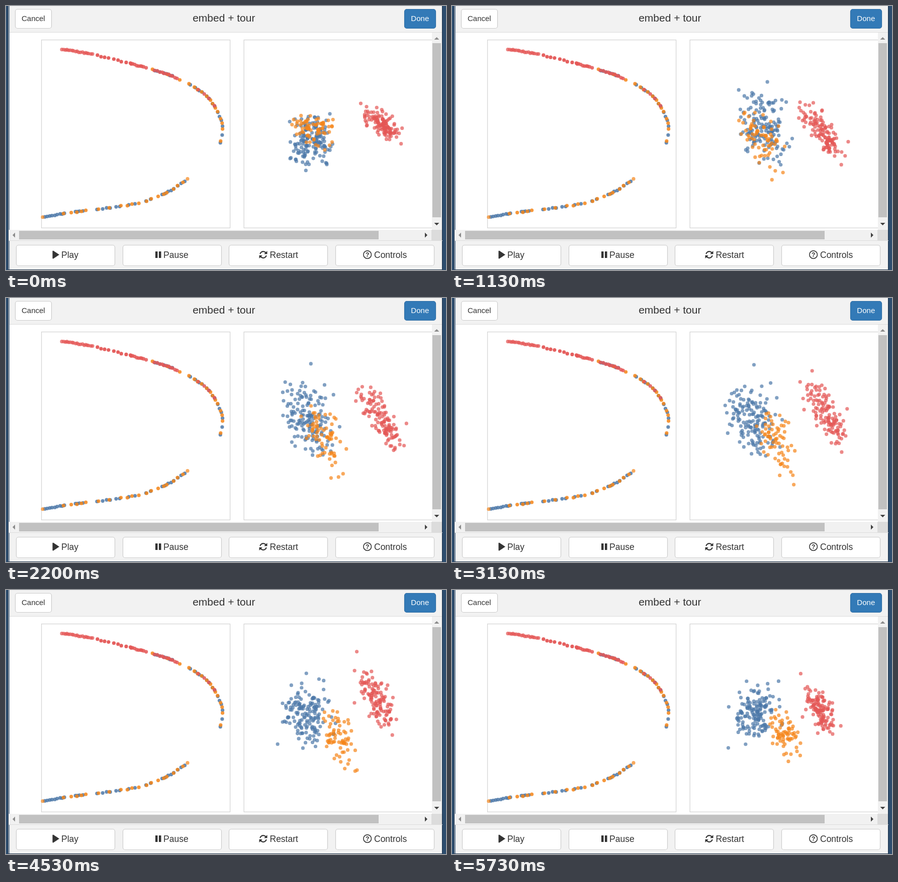
These frames come from a looping animation (875 px wide and 526 px high, 5.87 s). An HTML page with a canvas:

```html
<!DOCTYPE html>
<html lang="en">
<head>
<meta charset="utf-8">
<title>embed + tour</title>
<style>
html, body { margin: 0; width: 100%; height: 100%; overflow: hidden; background: #f2f2f2; }
canvas { display: block; width: 875px; height: 526px; }
</style>
</head>
<body>
<canvas id="stage" width="875" height="526"></canvas>
<script>
const ctx = document.getElementById('stage').getContext('2d');
const LOOP = 5870;
const BLUE = '#4c78a8', ORANGE = '#f58518', RED = '#e45756';
const INK = '#333';
const FONT = '"Liberation Sans", Arial, sans-serif';

// ---------- helpers ----------
const mix = (a, b, f) => a + (b - a) * f;

function random(seed) {
  return () => {
    seed = (seed + 0x6D2B79F5) | 0;
    let n = Math.imul(seed ^ (seed >>> 15), 1 | seed);
    n = (n + Math.imul(n ^ (n >>> 7), 61 | n)) ^ n;
    return ((n ^ (n >>> 14)) >>> 0) / 4294967296;
  };
}

// Smooth curve through vals given at keys, held at both ends.
function spline(keys, vals, t) {
  const last = keys.length - 1;
  if (t <= keys[0]) return vals[0];
  if (t >= keys[last]) return vals[last];
  let i = 0;
  while (keys[i + 1] <= t) i++;
  const slope = j => {
    const a = Math.max(j - 1, 0), b = Math.min(j + 1, last);
    return (vals[b] - vals[a]) / (keys[b] - keys[a]);
  };
  const w = keys[i + 1] - keys[i], f = (t - keys[i]) / w, g = 1 - f;
  return vals[i] * (1 + 2 * f) * g * g + vals[i + 1] * f * f * (3 - 2 * f) +
    w * f * g * (slope(i) * g - slope(i + 1) * f);
}

function rect(x, y, w, h, color) {
  ctx.fillStyle = color;
  ctx.fillRect(x, y, w, h);
}

function poly(color, ...pts) {
  ctx.fillStyle = color;
  ctx.beginPath();
  for (let i = 0; i < pts.length; i += 2) ctx.lineTo(pts[i], pts[i + 1]);
  ctx.fill();
}

function dot(x, y, color, alpha) {
  ctx.globalAlpha = alpha;
  ctx.fillStyle = color;
  ctx.beginPath();
  ctx.arc(x, y, 3.6, 0, Math.PI * 2);
  ctx.fill();
  ctx.globalAlpha = 1;
}

function text(str, x, y, size, color = INK, align = 'left', weight = 400) {
  ctx.font = `${weight} ${size}px ${FONT}`;
  ctx.textAlign = align;
  ctx.fillStyle = color;
  ctx.fillText(str, x, y);
}

function button(x, y, w, h, fill = '#fff', line = '#ccc') {
  ctx.beginPath();
  ctx.roundRect(x + 0.5, y + 0.5, w - 1, h - 1, 4.5);
  ctx.fillStyle = fill;
  ctx.fill();
  ctx.strokeStyle = line;
  ctx.lineWidth = 1.2;
  ctx.stroke();
}

// ---------- left plot: dots strung along two curves ----------
// Points are looked up by x + slant * y, which grows along the curve.
function curve(slant, pts) {
  const xs = pts.map(p => p[0]), ys = pts.map(p => p[1]);
  const keys = pts.map(p => p[0] + slant * p[1]);
  return k => [spline(keys, xs, k), spline(keys, ys, k)];
}

const arch = curve(1, [[111, 86], [172, 96.5], [278, 123], [340, 144], [400, 181],
  [429, 230], [430, 255], [426, 273]]);
const tail = curve(0, [[73, 421], [130, 411.5], [205, 402], [270, 391], [321, 371], [361, 345]]);

const bands = [];
const rnd = random(5);
function band(path, color, from, to, count, alpha = 0.85) {
  const gap = (to - from) / Math.max(count - 1, 1);
  for (let i = 0; i < count; i++) {
    const [x, y] = path(from + gap * (i + (rnd() - 0.5) * 0.5));
    bands.push([x, y + (rnd() - 0.5) * 2, color, alpha]);
  }
}
band(arch, BLUE, 424, 470, 7);
band(arch, BLUE, 524, 698, 14);
band(arch, ORANGE, 415, 496, 3);
band(arch, ORANGE, 519, 693, 13);
band(arch, RED, 197, 268, 19, 0.75);
band(arch, RED, 279, 361, 9, 0.95);
band(arch, RED, 364, 401, 9);
band(arch, RED, 424, 484, 11);
band(arch, RED, 547, 614, 4);
band(tail, BLUE, 77, 117, 9);
band(tail, BLUE, 137, 152, 4);
band(tail, BLUE, 183, 217, 5);
band(tail, BLUE, 229, 290, 5);
band(tail, BLUE, 309, 355, 8);
band(tail, ORANGE, 73, 73, 1, 0.7);
band(tail, ORANGE, 117, 161, 5);
band(tail, ORANGE, 184, 205, 2);
band(tail, ORANGE, 229, 301, 7);
band(tail, ORANGE, 312, 351, 5);
band(tail, ORANGE, 361, 361, 1, 0.7);

// ---------- right plot: clouds in four dimensions, slowly turned ----------
const KEYS = [0, 670, 2200, 4530, 5730];

// Spreads and tilt are [start, end, extra in the middle of the tour].
function cloud(color, count, seed, cx, cy, wide, high, tilt) {
  const next = random(seed);
  const bell = () => (next() + next() + next() - 1.5) * 2;
  const pts = Array.from({ length: count }, () => [bell(), bell(), bell(), bell()]);
  return { color, pts, cx, cy, wide, high, tilt };
}

const clouds = [
  cloud(BLUE, 151, 11, [608, 626, 601, 597, 602], [270, 247, 243, 250, 246],
    [21, 21, 3], [22, 24, 11], [0, -0.15, 0.35]),
  cloud(ORANGE, 68, 23, [615, 613, 634, 660, 659], [243, 257, 276, 293, 286],
    [20, 14, 4], [17, 21, 13], [0.1, 0.2, 0.45]),
  cloud(RED, 123, 37, [748, 734, 746, 737, 732], [235, 251, 238, 215, 237],
    [18, 14, 4], [18, 20, 14], [0.65, 0.4, 0.2])
];

function drawCloud({ color, pts, cx, cy, wide, high, tilt }, t) {
  const part = t / LOOP;
  const swell = Math.sin(Math.PI * part ** 0.7);
  const at = ([a, b, extra]) => mix(a, b, part) + extra * swell;
  const x = spline(KEYS, cx, t), y = spline(KEYS, cy, t);
  const sx = at(wide), sy = at(high), r = at(tilt);
  const rest = Math.sqrt(1 - r * r);
  const c = Math.cos(part * 2), s = Math.sin(part * 2);
  for (const p of pts) {
    const u = p[0] * c + p[2] * s, v = p[1] * c + p[3] * s;
    dot(x + sx * u, y + sy * (r * u + rest * v), color, 0.7);
  }
}

// ---------- window ----------
function frame() {
  rect(0, 0, 875, 526, '#f2f2f2');
  rect(5, 52, 863, 1, '#ddd');
  rect(5, 53, 842, 393, '#fff');
  ctx.strokeStyle = '#d5d5d5';
  ctx.lineWidth = 1.3;
  for (const x of [70.6, 473.2]) ctx.strokeRect(x, 67.6, 375, 374.6);
}

function scrollbars() {
  rect(847, 53, 20, 394, '#f1f1f1');
  rect(848, 74, 17, 347, '#c1c1c1');
  poly('#8b8b8b', 851.5, 67, 856.5, 62, 861.5, 67);
  poly('#404040', 851.5, 432, 861.5, 432, 856.5, 437);
  rect(5, 446, 842, 21, '#f1f1f1');
  rect(26, 448, 715, 17, '#c1c1c1');
  poly('#8b8b8b', 18, 451.5, 18, 461.5, 13, 456.5);
  poly('#404040', 833, 451.5, 833, 461.5, 838, 456.5);
  rect(846, 446, 21, 21, '#dcdcdc');
  rect(5, 467, 863, 1, '#ddd');
}

function icons() {
  poly(INK, 92.5, 488, 94, 487.6, 106, 495.5, 94, 503.4, 92.5, 503);
  rect(297, 489, 4.5, 13, INK);
  rect(304, 489, 4.5, 13, INK);
  ctx.strokeStyle = INK;
  ctx.lineWidth = 2.2;
  for (const turn of [0, Math.PI]) {
    ctx.save();
    ctx.translate(511.5, 495.5);
    ctx.rotate(turn);
    ctx.beginPath();
    ctx.arc(0, 0, 6.4, Math.PI * 1.07, Math.PI * 1.8);
    ctx.stroke();
    poly(INK, 8, -7.6, 8, -1.2, 1.6, -1.2);
    ctx.restore();
  }
  ctx.lineWidth = 1.6;
  ctx.beginPath();
  ctx.arc(718.7, 495.4, 7.8, 0, Math.PI * 2);
  ctx.stroke();
  text('?', 718.7, 499.8, 12, INK, 'center', 700);
}

function controls() {
  button(18, 6, 73, 39);
  text('Cancel', 54.3, 30, 15, INK, 'center');
  text('embed + tour', 433.3, 31, 21, INK, 'center');
  button(792, 6, 63, 39, '#337ab7', '#2e6da4');
  text('Done', 823.3, 30, 15, '#fff', 'center');
  for (let i = 0; i < 4; i++) button(Math.round(20 + i * 211.7), 476, 197, 42);
  text('Play', 110, 502, 17.5);
  text('Pause', 313, 502, 17.5);
  text('Restart', 524.5, 502, 17.5);
  text('Controls', 732, 502, 17.5);
  icons();
}

function edges() {
  for (const x of [0, 868]) rect(x, 0, 7, 526, '#2d4d6e');
  rect(5, 0, 1, 526, '#f2f2f2');
  for (const x of [4, 867]) rect(x, 0, 1, 526, '#1c3149');
  rect(4, 525, 864, 1, '#1c3149');
}

// Ticks fall on a grid of 15 per second: two early ones, then 7 in every 16 cells.
const cells = [0, 1, 2];
for (let n = 0; n <= 35; n++) cells.push(Math.round(6 + n * 16 / 7));
const ticks = cells.map(c => Math.round(c * 20 / 3) * 10);

const start = performance.now();
function draw() {
  const now = (performance.now() - start) % LOOP;
  const t = ticks.findLast(k => k <= now);
  frame();
  for (const b of bands) dot(...b);
  for (const c of clouds) drawCloud(c, t);
  edges();
  scrollbars();
  controls();
  requestAnimationFrame(draw);
}
draw();
</script>
</body>
</html>
```
